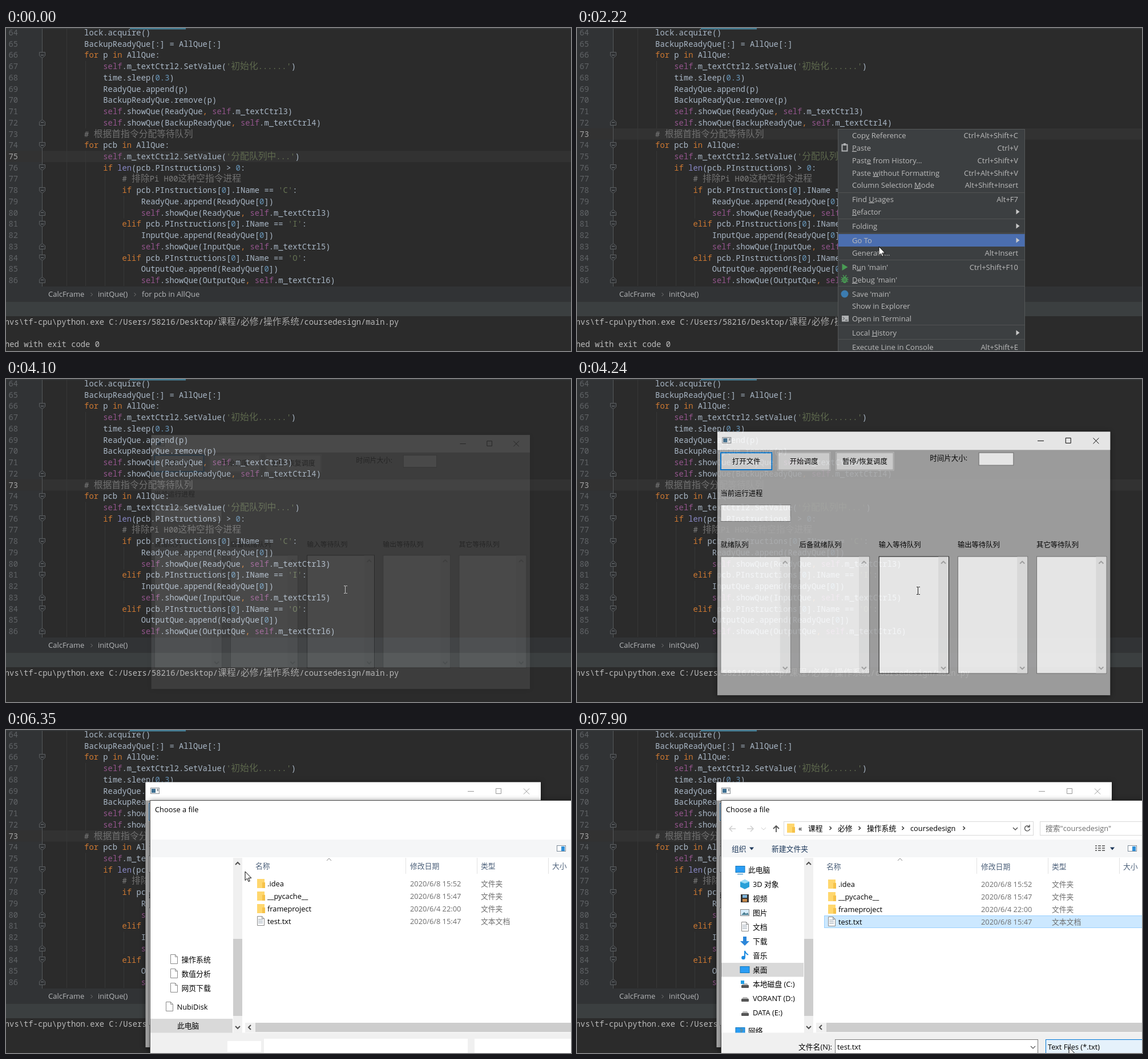
An HTML page for the animation above (7.99 s loop, 990 px wide and 566 px high).

```html
<!DOCTYPE html>
<html lang="zh">
<head>
<meta charset="utf-8">
<title>Running a script</title>
<style>
  html, body { margin: 0; width: 100%; height: 100%; overflow: hidden; background: #2b2b2b; }
  svg { display: block; width: 990px; height: 566px; }
  text { white-space: pre; font-family: "Open Sans", "Noto Sans CJK SC", "Noto Sans CJK", sans-serif; }
  .code { font-family: "Noto Sans Mono", "Noto Sans CJK SC", "Noto Sans CJK", monospace; font-size: 13.84px; }
  .han { font-family: "Noto Sans CJK SC", "Noto Sans CJK", sans-serif; font-size: 15.8px; font-weight: 300; fill-opacity: .85; }
  .frame { filter: drop-shadow(0 1px 5px rgba(0, 0, 0, .5)); }
  #win, #dialog { transform-box: view-box; }
  #win { transform-origin: 485px 250px; }
  #dialog { transform-origin: 650px 420px; }
</style>
</head>
<body>
<svg id="stage" viewBox="0 0 990 566" xmlns="http://www.w3.org/2000/svg"></svg>
<script>
const LOOP = 7990;
const $ = id => document.getElementById(id);

// Drawing helpers
const rect = (x, y, w, h, fill, stroke = 'none', extra = '') =>
  `<rect x="${x}" y="${y}" width="${w}" height="${h}" fill="${fill}" stroke="${stroke}" ${extra}/>`;
const path = (d, stroke, fill = 'none', w = 1) =>
  `<path d="${d}" stroke="${stroke}" fill="${fill}" stroke-width="${w}"/>`;
const text = (x, y, s, fill, size = 13, extra = '') =>
  `<text x="${x}" y="${y + size * .36}" font-size="${size}" fill="${fill}" ${extra}>${s}</text>`;
const group = (id, body) => `<g id="${id}">${body}</g>`;
const chevron = (x, y, dir, color, w = 1.5) => path({
  up: `M${x - 4},${y + 2}l4,-4l4,4`, down: `M${x - 4},${y - 2}l4,4l4,-4`,
  left: `M${x + 2},${y - 4}l-4,4l4,4`, right: `M${x - 1.5},${y - 3}l3,3l-3,3`
}[dir], color, 'none', w);

// Editor
const FIRST = 64, PITCH = 19.73, TOP = -1.7, INDENT = 33.2, LEFT = 70.7;
const rowTop = n => TOP + (n - FIRST) * PITCH;
const source = [
  '2lock.acquire()', '2BackupReadyQue[:] = AllQue[:]', '2for p in AllQue:',
  "3self.m_textCtrl2.SetValue('初始化......')", '3time.sleep(0.3)', '3ReadyQue.append(p)',
  '3BackupReadyQue.remove(p)', '3self.showQue(ReadyQue, self.m_textCtrl3)',
  '3self.showQue(BackupReadyQue, self.m_textCtrl4)', '2# 根据首指令分配等待队列',
  '2for pcb in AllQue:', "3self.m_textCtrl2.SetValue('分配队列中...')",
  '3if len(pcb.PInstructions) > 0:', '4# 排除Pi H00这种空指令进程',
  "4if pcb.PInstructions[0].IName == 'C':", '5ReadyQue.append(ReadyQue[0])',
  '5self.showQue(ReadyQue, self.m_textCtrl3)', "4elif pcb.PInstructions[0].IName == 'I':",
  '5InputQue.append(ReadyQue[0])', '5self.showQue(InputQue, self.m_textCtrl5)',
  "4elif pcb.PInstructions[0].IName == 'O':", '5OutputQue.append(ReadyQue[0])',
  '5self.showQue(OutputQue, self.m_textCtrl6)'
];
const han = s => s.replace(/[\u4e00-\u9fff]+/g, '<tspan class="han">$&</tspan>');
const tokenColors = ['#7c7c7c', '#667353', '#cc7832', '#94558d', '#8888c6', '#6897bb'];
const highlight = s => s.replace(
  /(#.*)|('[^']*')|(\b(?:for|in|if|elif)\b|,)|(\bself\b)|(\blen\b)|(\b\d+(?:\.\d+)?\b)/g,
  (m, ...g) => `<tspan fill="${tokenColors[g.findIndex((v, i) => i < 6 && v)]}">${han(m)}</tspan>`);
const codeText = (x, base, s, fill = '#a9b7c6', id = '') =>
  `<text class="code" ${id && `id="${id}"`} x="${x}" y="${base}" fill="${fill}">${s}</text>`;

function foldMark(n, closes) {
  const y = Math.round(rowTop(n) + 10) - .5, k = closes ? -1 : 1;
  return path(`M58.5,${y - 5 * k}h10v${6 * k}l-5,${4 * k}l-5,${-4 * k}z`, '#5d6062', '#2f3133') +
    path(`M61,${y}h5`, '#74777a');
}
const guide = (level, from, to) =>
  path(`M${Math.round(73 + level * INDENT) + .5},${rowTop(from)}V${rowTop(to + 1)}`, '#373838');

function editor() {
  const lines = source.map((s, i) => {
    const n = FIRST + i, base = rowTop(n) + 14.7;
    return codeText(4.5, base, n, '#606366', 'n' + n) +
      codeText(LEFT + s[0] * INDENT, base, highlight(s.slice(1)));
  }).join('');
  const crumb = (x, s) => text(x, 466.5, s, '#b4b6b8');
  return rect(0, 0, 990, 566, '#2b2b2b') + rect(0, 0, 63, 453, '#313335') +
    rect(0, 0, 990, PITCH, '#323232', 'none', 'id="caret"') +
    guide(1, 64, 86) + guide(2, 67, 72) + guide(2, 75, 86) + guide(3, 77, 86) +
    guide(4, 79, 80) + guide(4, 82, 83) + guide(4, 85, 86) +
    path('M63.5,0V453', '#55585a') +
    [66, 74, 76, 78, 81, 84].map(n => foldMark(n)).join('') +
    [72, 80, 83, 86].map(n => foldMark(n, true)).join('') + lines +
    rect(0, 0, 990, 1.5, '#393c3e') + rect(217, 0, 98, 2.5, '#477f96') +
    rect(0, 453, 990, 26, '#313335') + rect(0, 479, 990, 26, '#3b3f40') +
    rect(0, 479, 990, 1, '#323435') + rect(0, 505, 990, 61, '#2b2b2b') +
    crumb(74, 'CalcFrame') + chevron(150, 467, 'right', '#777', 1) + crumb(161, 'initQue()') +
    group('crumb', chevron(226, 467, 'right', '#777', 1) + crumb(238, 'for pcb in AllQue')) +
    codeText(-2.2, 520, han('nvs\\tf-cpu\\python.exe C:/Users/58216/Desktop/课程/必修/操作系统/coursedesign/main.py'), '#bbb') +
    codeText(-2, 559, 'hed with exit code 0', '#bbb', 'exit');
}

// Context menu: label with _mnemonic, shortcut ('>' opens a submenu), centre y
const menuRows = [
  ['Cop_y Reference', 'Ctrl+Alt+Shift+C', 188], ['_Paste', 'Ctrl+V', 210],
  ['Past_e from History...', 'Ctrl+Shift+V', 232], ['Paste _without Formatting', 'Ctrl+Alt+Shift+V', 254],
  ['Column Selection _Mode', 'Alt+Shift+Insert', 275], ['Find _Usages', 'Alt+F7', 300],
  ['_Refactor', '>', 322], ['Folding', '>', 347], ['Go To', '>', 372],
  ['Generate...', 'Alt+Insert', 394], ["R_un 'main'", 'Ctrl+Shift+F10', 419], ["_Debug 'main'", '', 441],
  ["Save 'main'", '', 466], ['Show in Explorer', '', 487.5], ['Open in Terminal', '', 509],
  ['Local _History', '>', 534], ['Execute Line in Console', 'Alt+Shift+E', 559]
];

function menu() {
  const rows = menuRows.map(([label, key, y]) =>
    text(482, y, label.replace(/_(.)/, '<tspan text-decoration="underline">$1</tspan>'), '#bbb') +
    (key === '>' ? path(`M769.5,${y - 4.5}l6,4.5l-6,4.5z`, 'none', '#c8c8c8')
                 : text(773, y, key, '#bbb', 13, 'text-anchor="end"'))).join('');
  const rules = [289, 335, 360, 407, 453, 521, 546].map(y => path(`M458,${y - .5}H784`, '#515354')).join('');
  const icons = rect(464.5, 204.5, 9, 11, 'none', '#afb1b3', 'stroke-width="2"') + rect(467, 202, 4, 4, '#afb1b3') +
    path('M464.5,413l10,6l-10,6z', 'none', '#499c54') +
    path('M463,437l12,8M463,445l12,-8M462.5,441h13M466,433l2,3M472,433l-2,3', '#499c54', 'none', 1.5) +
    '<ellipse cx="469" cy="441.5" rx="4" ry="5.5" fill="#499c54"/>' + path('M466.5,440h5M466.5,443h5', '#3c3f41') +
    '<circle cx="469" cy="466" r="6.5" fill="#3c7cb0"/>' +
    rect(464, 504, 12, 10.5, '#afb1b3') + path('M466,506.5l2.5,2.5l-2.5,2.5M470,512h4', '#3c3f41');
  return rect(457.5, 177.5, 327, 400, '#3c3f41', '#555758') + rules +
    rect(458, 0, 326.5, 22, '#4b6eaf', 'none', 'id="menuHover"') + rows + icons;
}

// Scheduler window
const button = (x, w, label, id) =>
  rect(x - .5, 127.5, w + 1, 32, 'none', '#d2d2d2') +
  rect(x + .5, 128.5, w - 1, 30, '#e1e1e1', '#b0b0b0', `id="${id}"`) +
  text(x + w / 2, 143.5, label, '#000', 12.5, 'text-anchor="middle"');
const field = (x, y, w, h, id = '') => rect(x + .5, y + .5, w - 1, h - 1, '#fff', '#7a7a7a', id && `id="${id}"`);

function appWindow() {
  const columns = ['就绪队列', '后备就绪队列', '输入等待队列', '输出等待队列', '其它等待队列'].map((name, i) => {
    const x = Math.round(250 + i * 139.25);
    return text(x, 291, name, '#000', 12.4) + field(x, 311, 124, 207, 'col' + i) +
      rect(x + 105, 312, 18, 205, '#f0f0f0') +
      chevron(x + 114, 322, 'up', '#b0b0b0', 2) + chevron(x + 114, 508, 'down', '#b0b0b0', 2);
  }).join('');
  return rect(244.5, 91.5, 692.5, 464.5, '#ababab', 'none', 'class="frame"') + rect(244.5, 91.5, 692.5, 32, '#fff') +
    rect(253.5, 101.5, 15, 10, '#f4f4f4', '#8a8f94') + rect(255, 103, 7, 7, '#3d6f91') + rect(265, 103, 2, 4, '#8a8f94') +
    `<g id="controls" fill="none"><path d="M809,107.5h11M858.5,102.5h9v9h-9zM907,102.5l10,10M917,102.5l-10,10"/></g>` +
    button(250, 91, '打开文件', 'open') + button(351, 92, '开始调度', 'run') + button(454, 101, '暂停/恢复调度', 'pause') +
    text(619, 137.5, '时间片大小:', '#000', 12.6) + field(705, 128, 62, 23) +
    text(250, 200, '当前运行进程', '#000', 12.4) + field(250, 220, 124, 30) + columns;
}

// File dialog
const folder = (x, y) => rect(x, y - 8, 13, 16, '#ffd76e') + rect(x + 9, y - 2, 5, 10, '#f6c24a');
const sheet = (x, y) => path(`M${x + .5},${y - 8.5}h8l4,4v12h-12zM${x + 8.5},${y - 8.5}v4h4`, '#8a8a8a', '#fff');
const lines = (x, y) => path(`M${x},${y - 3}h8M${x},${y}h8M${x},${y + 3}h8`, '#8b9aa8');
const screen = (x, y) => rect(x, y - 6.5, 16, 11, '#2a9df4', '#1577b8');
const disk = (x, y) => rect(x, y, 13, 5, '#555', 'none', 'rx="1"') + path(`M${x + 1},${y}l2,-3h7l2,3z`, 'none', '#bbb');

const navRows = [
  [0, '此电脑', 245, y => screen(278, y) + path(`M281,${y + 7.5}h10`, '#1577b8')],
  [1, '3D 对象', 270, y => path(`M286,${y - 4}l8,-4l8,4v9l-8,4l-8,-4z`, 'none', '#28a0d8') + path(`M286,${y - 4}l8,3l8,-3l-8,-4z`, 'none', '#9adcf5')],
  [1, '视频', 295, y => rect(287, y - 7, 14, 14, '#333') + rect(290, y - 6, 8, 5, '#7fb6dd') + rect(290, y + 1, 8, 5, '#c78a4a')],
  [1, '图片', 320, y => rect(286.5, y - 5.5, 15, 11, '#d8edfb', '#888') + path(`M288,${y + 4}l5,-5l3,3l3,-2l2,4z`, 'none', '#4b7f93')],
  [1, '文档', 345, y => sheet(288, y) + lines(290, y)],
  [1, '下载', 370, y => path(`M291,${y - 8}h6v8h5l-8,8l-8,-8h5z`, 'none', '#2b86d9')],
  [1, '音乐', 395, y => path(`M294,${y + 4}v-12q1,4 6,7`, '#1b8ae0', 'none', 2) + `<circle cx="291.5" cy="${y + 4}" r="3.3" fill="#1b8ae0"/>`],
  [1, '桌面', 420, y => screen(286, y + 1)],
  [1, '本地磁盘 (C:)', 445, y => disk(288, y + 2) + rect(287, y - 6, 6, 6, '#22a0e6')],
  [1, 'VORANT (D:)', 470, y => disk(288, y + 1)],
  [1, 'DATA (E:)', 495, y => disk(288, y + 1)],
  [0, '网络', 527, y => screen(278, y + 1) + path(`M285,${y - 6}l7,4l-5,8z`, 'none', '#4c8fb5')]
];
const files = [['.idea', '2020/6/8 15:52', '文件夹'], ['__pycache__', '2020/6/8 15:47', '文件夹'],
  ['frameproject', '2020/6/4 22:00', '文件夹'], ['test.txt', '2020/6/8 15:47', '文本文档']];

function dialog() {
  const grey = '#6d6d6d', head = '#4c607a', label = (x, y, s, c = '#000') => text(x, y, s, c, 12.8);
  const crumbs = [[388, '«'], [405, '课程'], [457, '必修'], [508, '操作系统'], [584, 'coursedesign']]
    .map(([x, s]) => label(x, 172, s)).join('') +
    [444, 495, 571, 678].map(x => chevron(x, 172, 'right', '#333')).join('');
  const address = path('M278,173h-11M272,168l-5,5l5,5M298,173h11M304,168l5,5l-5,5', '#cfcfcf', 'none', 1.5) +
    chevron(327, 173, 'down', '#ccc', 1) + path('M349,179v-11M344,173l5,-5l5,5', '#555', 'none', 1.8) +
    rect(362.5, 160.5, 437, 24, '#fff', '#d9d9d9') + folder(368, 172) + crumbs +
    chevron(768, 173, 'down', '#555') + path('M777.5,161v23', '#d9d9d9') +
    path('M792,169a4.5,4.5 0 1 0 1.5,4M793,166v4h-4', '#555', 'none', 1.4) +
    rect(811.5, 160.5, 230, 24, '#fff', '#d9d9d9') + label(821, 172.5, '搜索"coursedesign"', grey);
  const tools = label(271, 208, '组织', '#1e395b') + path('M302,205.5h8l-4,5z', 'none', '#1e395b') +
    label(341, 208, '新建文件夹', '#1e395b') + path('M934,205.5h8l-4,5z', 'none', '#1e395b') +
    [203, 207, 211].map(y => path(`M908,${y}h3M913,${y}h5M920,${y}h5`, '#777', 'none', 2)).join('');
  const nav = rect(253, 408, 144, 24.5, '#d9d9d9') +
    navRows.map(([depth, s, y, icon]) => icon(y) + label(depth ? 308 : 300, y, s)).join('');
  const early = [[288, 402, '操作系统'], [288, 427, '数值分析'], [288, 452, '网页下载'], [280, 485, 'NubiDisk']]
    .map(([x, y, s]) => sheet(x, y) + label(x + 19.5, y, s)).join('') +
    rect(253, 506, 144, 25, '#d9d9d9') + label(300, 518.5, '此电脑');
  const list = [[437, '名称'], [708, '修改日期'], [832, '类型'], [957, '大小']].map(([x, s]) => label(x, 239, s, head)).join('') +
    rect(433.5, 0, 570, 21, '#e5f3ff', 'none', 'id="row"') +
    files.map(([name, date, kind], i) => {
      const y = 270 + 22 * i;
      return (i < 3 ? folder(440, y) : sheet(440, y) + lines(442, y)) + label(458, y + .5, name) +
        label(708, y + .5, date, grey) + label(832, y + .5, kind, grey);
    }).join('');
  return rect(252.5, 123.5, 800, 600, '#fff', '#4d4d4d', 'class="frame"') + label(261, 139.5, 'Choose a file') +
    rect(253, 192, 790, 31, '#f5f6f7') + rect(965.5, 202.5, 15, 10, '#fff', '#7d8b99') + rect(973, 204, 6, 8, '#2f8fd8') +
    group('chrome', address + tools) + group('navEarly', early) + group('nav', nav) +
    rect(398, 224, 16, 307, '#f0f0f0') + rect(398, 366, 16, 135, '#cdcdcd') +
    chevron(406, 234, 'up', '#505050', 2) + chevron(406, 521, 'down', '#505050', 2) +
    path('M700.5,224v28M825.5,224v28M950.5,224v28', '#e2e2e2') + chevron(566, 227, 'up', '#888', 1) +
    group('files', list) +
    rect(419, 513, 630, 17, '#f0f0f0') + rect(437, 513, 610, 16, '#cdcdcd') + chevron(427, 521, 'left', '#505050', 2) +
    rect(253, 530.5, 790, 60, '#f0f0f0') +
    group('footEarly', rect(388, 545, 59, 19, '#fff') + rect(452, 541, 357, 30, '#fff') + rect(821, 541, 180, 30, '#fff')) +
    group('foot', label(388, 555, '文件名(N):') + rect(452.5, 542.5, 355, 30, '#fff', '#7a7a7a') +
      chevron(799, 556, 'down', '#555', 1.2) + rect(821.5, 542.5, 190, 30, '#e1e1e1', '#adadad', 'id="filter"') +
      label(825, 555.5, 'Text Files (*.txt)') + group('chosen', label(456, 555.5, 'test.txt')));
}

const beam = 'M-3,-6.5h2.5M.5,-6.5h2.5M-.5,-6.5v13M-3,6.5h2.5M.5,6.5h2.5';
$('stage').innerHTML = editor() + group('menu', menu()) + group('win', appWindow()) + group('dialog', dialog()) +
  group('cursor',
    `<path id="arrow" d="M0,0V15.5L3.6,12.2L6,17.6L8.2,16.6L5.9,11.3H10.8Z" fill="#fff" stroke="#000"/>` +
    `<path id="beam" d="${beam}" fill="none"/>` +
    `<circle id="ring" r="9" fill="none" stroke="#3d9be0" stroke-width="4"/>`);

// Pointer moves: start, end, number of steps, waypoints
const moves = [
  [270, 1050, 11, [640, 300], [473, 182]], [1140, 1140, 1, [459, 176]],
  [2050, 2460, 6, [529, 383], [558, 434]], [2680, 2770, 2, [563, 419]],
  [3770, 4100, 5, [595, 369]], [4160, 4240, 2, [598, 371]], [4640, 5410, 11, [301, 141]],
  [6050, 6350, 5, [419, 248]], [6440, 6830, 6, [482, 318]], [6900, 6980, 2, [486, 330]],
  [7220, 7900, 10, [862, 556]]
];
// Window openings: time, opacity, scale
const winSteps = [[0, 0, 1], [4100, .14, .958], [4160, .5, .98], [4240, .88, .994], [4340, 1, 1]];
const dialogSteps = [[0, 0, 1], [6130, .2, .96], [6210, .6, .98], [6270, .9, .993], [6350, 1, 1]];

function pointer(t) {
  let pos = [890, 540];
  for (const [start, end, steps, ...points] of moves) {
    if (t < start) break;
    const gap = (end - start) / Math.max(steps - 1, 1) || 1;
    const k = Math.min(steps, Math.floor((t - start + 12) / gap) + 1), p = k / steps;
    const s = p * p * (3 - 2 * p) * points.length, i = Math.min(points.length - 1, Math.floor(s));
    const a = i ? points[i - 1] : pos, b = points[i];
    pos = a.map((v, j) => v + (b[j] - v) * (s - i));
  }
  return pos.map(Math.round);
}
const show = (id, on) => { $(id).style.display = on ? '' : 'none'; };
const paint = (id, attrs) => { for (const k in attrs) $(id).setAttribute(k, attrs[k]); };
function zoomIn(id, steps, t) {
  const [, alpha, scale] = steps.filter(s => s[0] <= t).pop();
  show(id, alpha > 0);
  $(id).style.opacity = alpha;
  $(id).style.transform = `scale(${scale})`;
}

function render(t) {
  const [x, y] = pointer(t), within = (a, b) => t >= a && t < b;
  const line = t < 1520 ? 75 : 73;
  paint('caret', { y: rowTop(line) });
  for (const n of [73, 75]) paint('n' + n, { fill: n === line ? '#a4a3a3' : '#606366' });
  show('crumb', t < 1670);
  show('exit', t < 3770);

  show('menu', within(1670, 3090));
  const hovered = t >= 2050 && menuRows.find(r => Math.abs(r[2] - y) <= 11.5);
  show('menuHover', hovered);
  if (hovered) paint('menuHover', { y: hovered[2] - 11 });

  zoomIn('win', winSteps, t);
  paint('controls', { stroke: t < 5660 ? '#000' : '#999' });
  const inField = t >= 4100 && t < 6050 && x > 528 && y > 311;
  paint('col2', { stroke: inField ? '#171717' : '#7a7a7a' });
  const over = t > 4640 && x < 341 && y < 159;
  paint('open', { fill: t >= 5580 ? '#cce4f7' : over ? '#e5f1fb' : '#e1e1e1',
    stroke: t >= 5580 ? '#2a6ea6' : '#0078d7', 'stroke-width': t >= 5580 || over ? 1 : 2 });

  zoomIn('dialog', dialogSteps, t);
  show('chrome', t >= 6440);
  const loaded = t >= 6520;
  show('nav', loaded);
  show('navEarly', !loaded);
  show('foot', loaded);
  show('footEarly', !loaded);
  paint('files', { transform: `translate(0 ${t < 6440 ? -1 : 0})` });
  show('row', t >= 6830);
  paint('row', { y: t < 6900 ? 303.5 : 325.5, fill: t < 6980 ? '#e5f3ff' : '#cce8ff', stroke: t < 6980 ? 'none' : '#99d1ff' });
  show('chosen', t >= 6980);
  const onFilter = x > 821 && y > 541;
  paint('filter', { fill: onFilter ? '#e5f1fb' : '#e1e1e1', stroke: onFilter ? '#0078d7' : '#adadad' });

  const busy = within(3370, 3450);
  const isBeam = t < 2050 || within(3090, 4160) || inField;
  show('cursor', t >= 270);
  paint('cursor', { transform: `translate(${x} ${y})` });
  show('ring', busy);
  show('beam', isBeam && !busy);
  show('arrow', !isBeam);
  paint('beam', { stroke: t < 4160 ? '#c4c4c4' : '#222' });
}

const began = performance.now();
function tick() {
  render((performance.now() - began) % LOOP);
  requestAnimationFrame(tick);
}
tick();
</script>
</body>
</html>
```
